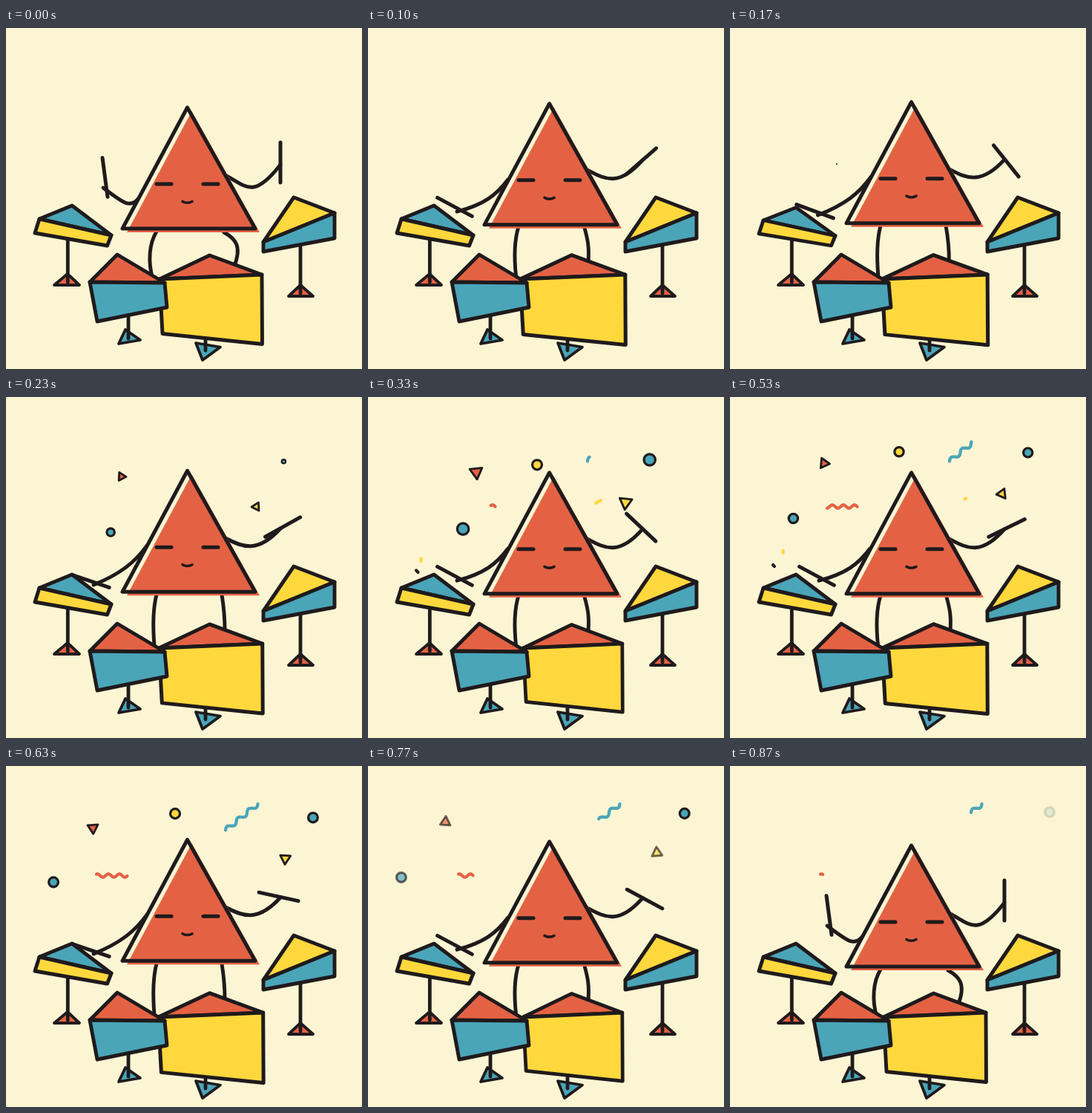
An HTML page with a canvas for the animation above (0.91 s loop, 480x459 px).

```html
<!DOCTYPE html>
<html lang="en">
<head>
<meta charset="utf-8">
<title>Triangle drummer</title>
<style>
  html, body { margin: 0; width: 100%; height: 100%; overflow: hidden; background: #fbf5d3; }
  canvas { display: block; }
</style>
</head>
<body>
<canvas id="stage" width="480" height="459"></canvas>
<script>
const ctx = document.getElementById('stage').getContext('2d');
const PAPER = '#fbf5d3', INK = '#1f1a1c', RED = '#e46244', TEAL = '#4aa5b9', YELLOW = '#ffd83d';
const LOOP = 910, STEPS = 26, BAR = STEPS / 2;
const TURN = Math.PI * 2, DEG = TURN / 360;

const mix = (a, b, k) => a + (b - a) * k;
const blend = (a, b, k) => a.map((v, j) => mix(v, b[j], k));
const clamp = v => Math.max(0, Math.min(1, v));
const smooth = k => k * k * (3 - 2 * k);

function paint(fill, width, color = INK) {
  if (fill) { ctx.fillStyle = fill; ctx.fill(); }
  if (width) { ctx.strokeStyle = color; ctx.lineWidth = width; ctx.stroke(); }
}

function shape(points, fill, width = 4.9) {
  ctx.beginPath();
  for (let j = 0; j < points.length; j += 2) ctx.lineTo(points[j], points[j + 1]);
  ctx.closePath();
  paint(fill, width);
}

function line(x1, y1, x2, y2, width = 5) {
  ctx.beginPath();
  ctx.moveTo(x1, y1);
  ctx.lineTo(x2, y2);
  paint(null, width);
}

function limb([x, y, ...curve]) {
  ctx.beginPath();
  ctx.moveTo(x, y);
  ctx.bezierCurveTo(...curve);
  paint(null, 4.9);
}

function stick(x, y, degrees, back, front) {
  const c = Math.cos(degrees * DEG), s = Math.sin(degrees * DEG);
  line(x - c * back, y - s * back, x + c * front, y + s * front);
}

// Runs draw in coordinates scaled around a fixed point.
function scaled(x, y, sx, sy, draw) {
  ctx.save();
  ctx.translate(x, y);
  ctx.scale(sx, sy);
  ctx.translate(-x, -y);
  draw();
  ctx.restore();
}

// Confetti pops in with a damped bounce, drifts from start to end, then fades.
const pop = k => 1 - Math.exp(-6 * k) * Math.cos(12 * k);
const fade = k => clamp((1 - k) / 0.15);

function disc(step, color, birth, life, [x1, y1], [x2, y2]) {
  const k = (step - birth) / life;
  if (k < 0 || k >= 1) return;
  ctx.globalAlpha = fade(k);
  ctx.beginPath();
  ctx.arc(mix(x1, x2, smooth(k)), mix(y1, y2, smooth(k)), 0.4 + 6 * pop(k), 0, TURN);
  paint(color, 3.2 * Math.min(1, 0.4 + 6 * k));
  ctx.globalAlpha = 1;
}

function wedge(step, color, [x1, y1], [x2, y2], angle, spin) {
  const k = (step - 5) / 20;
  if (k <= 0 || k >= 1) return;
  const r = 8 * pop(k), points = [];
  for (let j = 0; j < 3; j++) {
    const a = (angle + spin * k + j * 120) * DEG;
    points.push(mix(x1, x2, k) + r * Math.cos(a), mix(y1, y2, k) + r * Math.sin(a));
  }
  ctx.globalAlpha = fade(k);
  shape(points, color, 2.8);
  ctx.globalAlpha = 1;
}

// A straight or wavy stroke that draws itself, then is wiped from its start.
function streak(step, color, birth, life, [x1, y1], [x2, y2], waves = 0, height = 0) {
  const k = (step - birth) / life;
  const tail = clamp(2 * k - 0.95), head = clamp(2.1 * k);
  if (head - tail < 0.01) return;
  const len = Math.hypot(x2 - x1, y2 - y1), nx = (y1 - y2) / len, ny = (x2 - x1) / len;
  ctx.beginPath();
  for (let j = 0; j <= 50; j++) {
    const s = mix(tail, head, j / 50), d = height * Math.sin(s * waves * TURN);
    ctx.lineTo(mix(x1, x2, s) + nx * d, mix(y1, y2, s) + ny * d);
  }
  paint(null, 4.2, color);
}

function confetti(step) {
  disc(step, TEAL, 5, 20, [144, 183], [42, 149]);
  disc(step, TEAL, 6, 20.4, [374, 87], [431, 62]);
  disc(step, YELLOW, 8, 15, [228, 93], [228, 58]);
  wedge(step, RED, [162, 111], [98, 71.5], 149, -261);
  wedge(step, YELLOW, [331, 151.5], [396, 113], 31, 260);
  streak(step, RED, 9, 18, [171.5, 147.5], [122, 147.5], 3.33, 2.2);
  streak(step, TEAL, 9, 21, [296, 86.5], [339.5, 51], 3, -2.8);
  streak(step, YELLOW, 7, 10, [307, 143], [318, 136.5]);
  streak(step, YELLOW, 9, 8, [71.5, 221], [71.5, 207]);
  streak(step, INK, 9, 8, [67.5, 236], [58, 226]);
}

function stand(x, top, bottom, foot, color) {
  shape(foot, color, 3.8);
  line(x, top, x, bottom, 4.8);
}

function drums(squash, sway) {
  stand(83.3, 285, 342, [83, 331, 99, 346, 65, 346], RED);
  stand(397, 292, 357, [397, 346, 414, 361, 381, 361], RED);
  stand(269, 414, 434, [256, 424, 289, 429.5, 265, 447], TEAL);
  stand(165, 388, 418, [161, 406, 181, 420, 152, 425], TEAL);

  scaled(84, 293, 1, 1 - 0.05 * squash, () => {
    shape([45, 257, 89, 239, 142, 279], TEAL);
    shape([45, 257, 142, 279, 136.5, 293, 39, 276], YELLOW);
  });

  shape([388, 228, 443, 249, 347, 288], YELLOW);
  shape([347, 288, 443, 249, 443, 283, 347, 301], TEAL);

  scaled(277, 336, 1 + 0.033 * sway, 1 + 0.015 * sway, () => {
    shape([207, 338, 274.5, 306, 345, 332], RED);
    shape([207, 338, 345, 332, 345.5, 425.5, 211, 411.5], YELLOW);
  });

  shape([113, 342, 150, 305, 214, 343], RED);
  shape([113, 342, 214, 343, 217, 376, 123, 395], TEAL);
}

// Limbs swing between a resting pose and a striking pose.
function legs(swing) {
  limb(blend([203, 274, 193, 290, 191, 315, 198, 338], [203, 266, 198, 285, 198, 310, 200, 335], swing));
  limb(blend([294, 275, 310, 284, 318, 294, 308, 320], [291, 266, 294, 285, 295, 295, 295, 315], swing));
}

function arms(swing, twirl) {
  limb(blend([180, 228, 167, 243, 160, 237, 131, 215], [190, 200, 174, 222, 155, 238, 118, 253], swing));
  stick(...blend([133.5, 201, 82.5], [114, 248, 18.5], swing), 26.5, 26.5);
  const right = blend([296, 198, 325, 215, 335, 229, 370, 184],
    [296, 190, 320, 203, 340, 210, 370.5, 176.5], swing);
  limb(right);
  stick(right[6], right[7], twirl, 24, 30);
}

function body(lift) {
  ctx.save();
  ctx.translate(0, -7.8 * lift);
  const outline = [244.5, 107, 157, 270, 336, 270];
  shape(outline, PAPER, 0);
  shape(outline.map((v, j) => v + (j % 2 ? 5 : 6)), RED, 0);
  shape(outline, null, 5);
  line(203, 210, 223, 210);
  line(266, 210, 286, 210);
  ctx.beginPath();
  ctx.moveTo(238, 233.5);
  ctx.quadraticCurveTo(244.5, 237, 251, 233.5);
  paint(null, 3.6);
  ctx.restore();
}

function draw() {
  const t = performance.now() % LOOP;
  const step = Math.min(STEPS, Math.floor((t + 4) * 0.03));   // 30 poses per second
  const beat = step % BAR, bar = beat / BAR, around = step / STEPS * TURN;
  const lift = Math.sin(Math.PI * bar), swing = lift ** 0.4;
  const squash = clamp(1 - Math.abs(beat - 5));
  const sway = Math.sin(TURN * bar ** 1.3);
  // Three full turns per loop, slightly uneven.
  const twirl = -90 - 3 * around / DEG + 10 * (Math.cos(2 * around) - Math.cos(around));

  ctx.fillStyle = PAPER;
  ctx.fillRect(0, 0, 480, 459);
  ctx.lineCap = ctx.lineJoin = 'round';
  confetti(step);
  legs(swing);
  drums(squash, sway);
  arms(swing, twirl);
  body(lift);
  requestAnimationFrame(draw);
}
draw();
</script>
</body>
</html>
```
